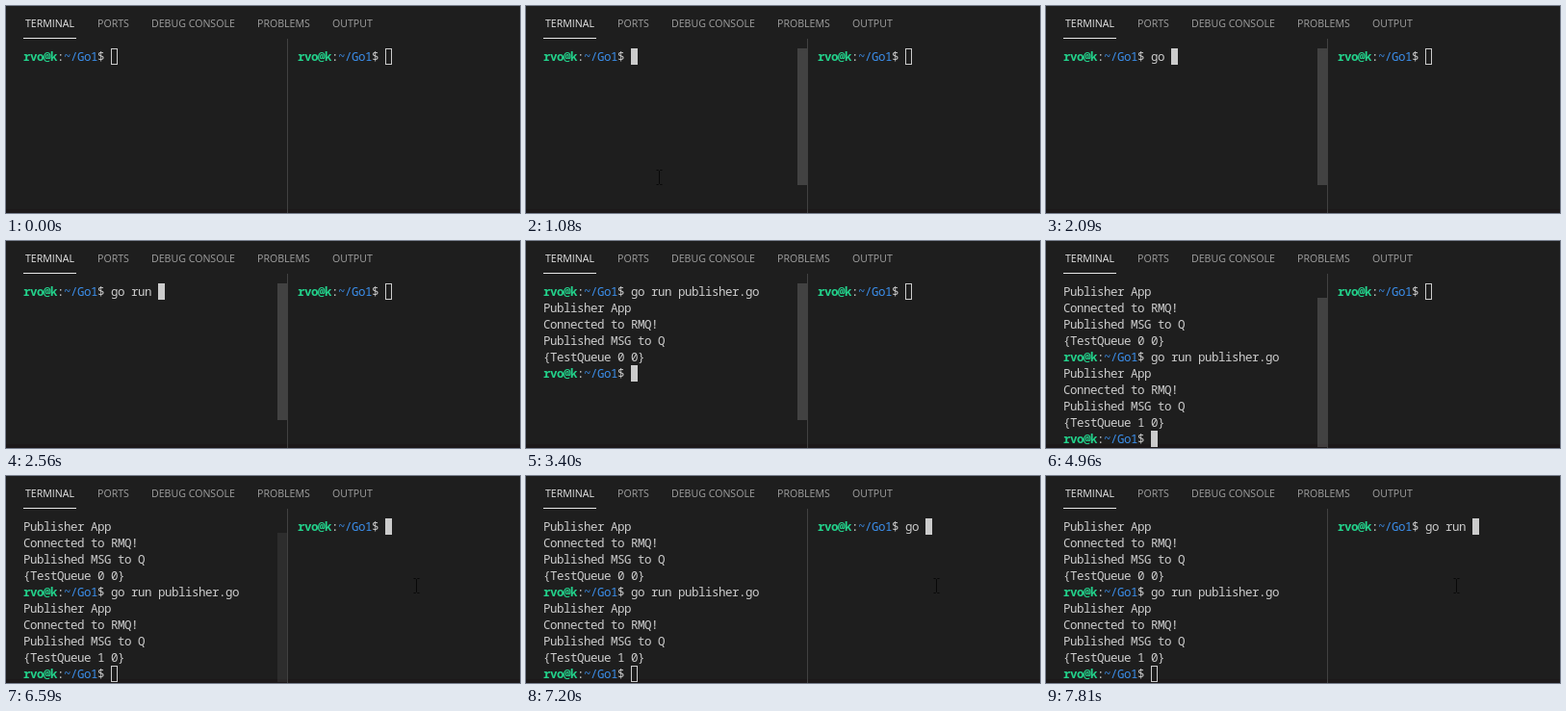
An HTML page for the animation above (8 s loop, 534 px wide and 215 px high).

```html
<!DOCTYPE html>
<html lang="en">
<head>
<meta charset="utf-8">
<title>Two terminals</title>
<style>
  html, body { margin: 0; width: 100%; height: 100%; overflow: hidden; background: #1e1e1e; }
  #stage { position: relative; width: 534px; height: 215px; overflow: hidden; background: #1e1e1e; }
  #stage > *, .cursor { position: absolute; }
  .tab { top: 10px; font: 10.6px/16px "Open Sans", sans-serif; color: #a0a0a0; white-space: pre; }
  .tab.active { color: #e7e7e7; }
  #underline { left: 18px; top: 33px; width: 55px; height: 1px; background: #e7e7e7; }
  #divider { left: 292px; top: 34px; width: 1px; height: 181px; background: #414141; }
  #edge { left: 0; top: 211px; width: 534px; height: 4px; background: #1c1819; }
  #bar { left: 282px; width: 10px; background: #797979; }
  /* one cell is 7 by 17 px */
  .term {
    top: 44px; height: 171px; color: #ccc;
    font: 500 12.5px/17px "Noto Sans Mono", monospace; letter-spacing: -.5px;
  }
  .line { height: 17px; white-space: pre; }
  .user { color: #23d18b; font-weight: 700; }
  .path { color: #3b8eea; }
  .cursor { box-sizing: border-box; width: 7px; height: 17px; border: 1px solid #ccc; }
  .cursor.focus { background: #ccc; }
  #pointer { width: 9px; height: 16px; }
</style>
</head>
<body>
<div id="stage">
  <div id="edge"></div>
  <div class="tab active" style="left:20px">TERMINAL</div>
  <div class="tab" style="left:95px">PORTS</div>
  <div class="tab" style="left:151px">DEBUG CONSOLE</div>
  <div class="tab" style="left:261px">PROBLEMS</div>
  <div class="tab" style="left:339px">OUTPUT</div>
  <div id="underline"></div>
  <div id="divider"></div>
  <div id="bar"></div>
  <div class="term" id="left" style="left:18px"></div>
  <div class="term" id="right" style="left:303px"></div>
  <svg id="pointer" viewBox="0 0 9 16">
    <path d="M1.5 .5H3.5L4.5 1.5L5.5 .5H7.5M4.5 1.5V14.5M1.5 15.5H3.5L4.5 14.5L5.5 15.5H7.5" fill="none" stroke="#080808"/>
  </svg>
</div>
<script>
const LOOP = 8000, ROWS = 10, CELL_W = 7, CELL_H = 17;
const COMMAND = 'go run publisher.go ';
const PROMPT = '<span class="user">rvo@k</span>:<span class="path">~/Go1</span>$ ';
const PROMPT_LEN = 13;
const $ = id => document.getElementById(id);

// [time, value] steps, each held until the next
const LEFT_TYPED = [[0, 0], [1550, 1], [1860, 2], [2090, 3], [2160, 4], [2330, 5],
  [2480, 6], [2560, 7], [2790, 8], [3020, COMMAND.length]];
const RIGHT_TYPED = [[0, 0], [6890, 1], [7120, 2], [7200, 3], [7350, 4],
  [7580, 5], [7660, 6], [7810, 7]];
const FOCUS = [[0, ''], [450, 'left'], [6120, 'right']];
const BAR_ALPHA = [[0, 0], [380, .13], [450, .27], [530, .4], [6200, .3], [6590, .17], [6890, 0]];
const BAR_BOX = [[0, [44, 142]], [4960, [59, 155]]];
const POINTER = [[0, null], [380, [134, 126]], [1080, [134, 170]], [1150, null],
  [5970, [422, 150]], [6050, [422, 128]], [6120, [422, 106]]];

function at(steps, t) {
  let value = steps[0][1];
  for (const [time, next] of steps) if (t >= time) value = next;
  return value;
}

const output = n => ['Publisher App', 'Connected to RMQ!', 'Published MSG to Q', `{TestQueue ${n} 0}`];

function leftScreen(t) {
  const typed = at(LEFT_TYPED, t);
  const lines = [PROMPT + COMMAND.slice(0, typed)];
  let col = PROMPT_LEN + typed;
  const add = (nextCol, ...rows) => { lines.push(...rows); col = nextCol; };

  if (t >= 3400) add(PROMPT_LEN, ...output(0), PROMPT);
  else if (t >= 3250) add(0, '');

  if (t >= 4580) {
    lines[lines.length - 1] += COMMAND;
    col += COMMAND.length;
  }
  if (t >= 4960) add(PROMPT_LEN, ...output(1), PROMPT);
  else if (t >= 4730) add(0, '');
  return { lines: lines.slice(-ROWS), col };
}

function rightScreen(t) {
  const typed = at(RIGHT_TYPED, t);
  return { lines: [PROMPT + COMMAND.slice(0, typed)], col: PROMPT_LEN + typed };
}

function drawTerm(id, { lines, col }, focused) {
  const top = (lines.length - 1) * CELL_H;
  const html = lines.map(line => `<div class="line">${line}</div>`).join('') +
    `<div class="cursor${focused ? ' focus' : ''}" style="left:${col * CELL_W}px;top:${top}px"></div>`;
  const el = $(id);
  if (el.shown !== html) el.innerHTML = el.shown = html;
}

function draw(t) {
  const focus = at(FOCUS, t);
  drawTerm('left', leftScreen(t), focus === 'left');
  drawTerm('right', rightScreen(t), focus === 'right');

  const [top, height] = at(BAR_BOX, t);
  Object.assign($('bar').style, { top: top + 'px', height: height + 'px', opacity: at(BAR_ALPHA, t) });

  const spot = at(POINTER, t);
  const pointer = $('pointer').style;
  pointer.display = spot ? 'block' : 'none';
  if (spot) [pointer.left, pointer.top] = spot.map(v => v + 'px');
}

const start = performance.now();
function frame() {
  draw((performance.now() - start) % LOOP);
  requestAnimationFrame(frame);
}
frame();
</script>
</body>
</html>
```
